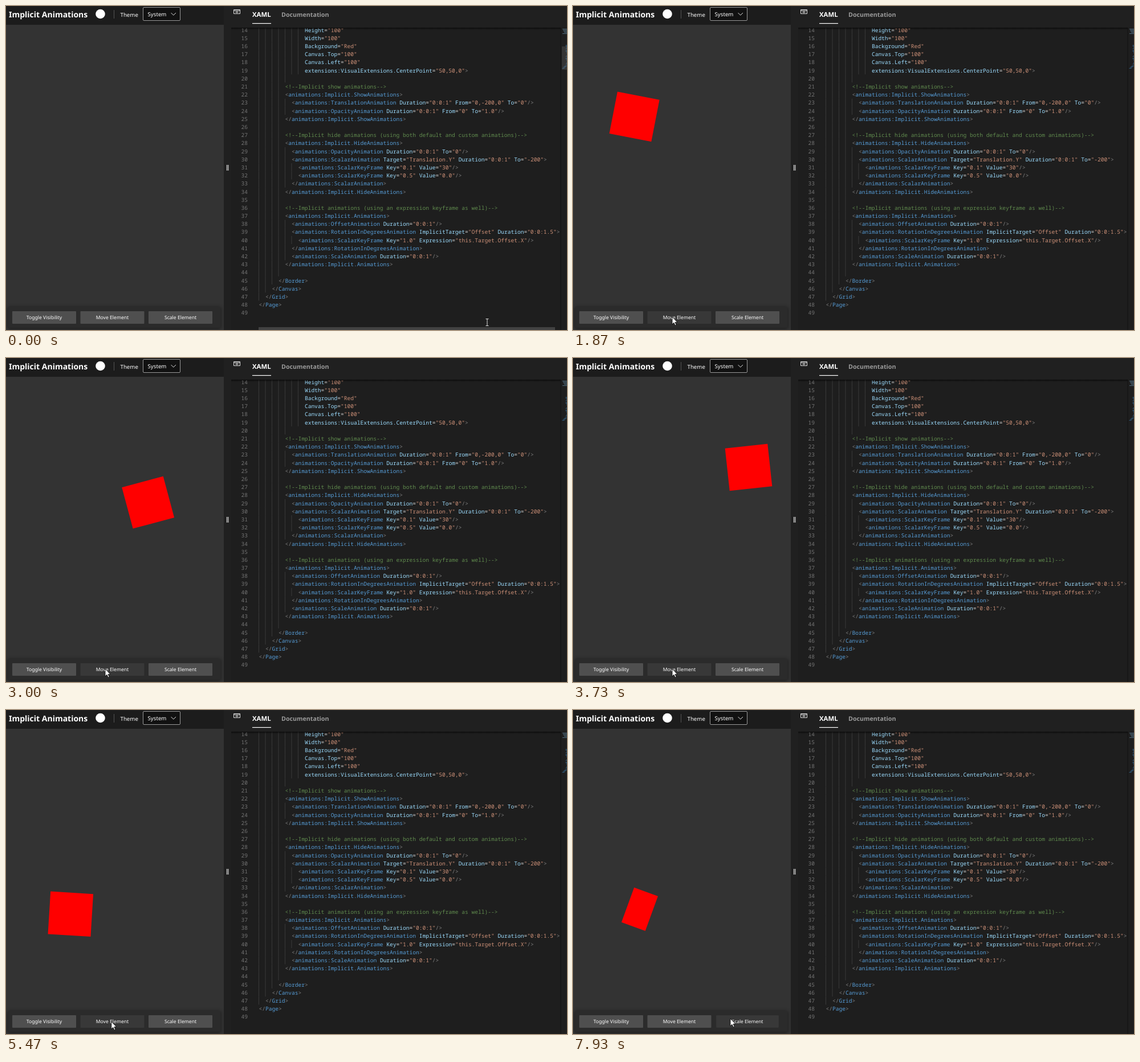
An HTML page for the animation above (8000 ms loop, 984 px wide and 569 px high).

```html
<!DOCTYPE html>
<html lang="en">
<head>
<meta charset="utf-8">
<title>Implicit Animations</title>
<style>
  html, body { margin: 0; width: 100%; height: 100%; overflow: hidden; background: #1e1e1e; }
  svg { display: block; width: 100%; height: 100%; }
  text { font-family: "Noto Sans", sans-serif; fill: #fff; text-rendering: geometricPrecision; }
  .code text { font: 500 9.573px "Noto Sans Mono", monospace; }
  .code .number { fill: #747474; font-weight: 400; text-anchor: end; }
  .comment { fill: #608b4e; }
  .delimiter { fill: #808080; }
  .tag { fill: #569cd6; }
  .attribute { fill: #9cdcfe; }
  .equals { fill: #d4d4d4; }
  .string { fill: #ce9178; }
  .button text { font-size: 8.6px; text-anchor: middle; }
</style>
</head>
<body>
<svg viewBox="0 0 984 569">
  <defs>
    <clipPath id="canvasClip"><rect y="33" width="382" height="536"/></clipPath>
    <filter id="blur" x="-10%" y="-50%" width="120%" height="200%"><feGaussianBlur stdDeviation="3"/></filter>
    <linearGradient id="fade" x2="0" y2="1">
      <stop stop-color="#000" stop-opacity=".6"/><stop offset="1" stop-color="#000" stop-opacity="0"/>
    </linearGradient>
  </defs>

  <!-- Preview pane -->
  <rect width="382" height="569" fill="#333"/>
  <g clip-path="url(#canvasClip)">
    <rect id="square" x="-37.5" y="-37.5" width="75" height="75" fill="#f00"/>
  </g>
  <rect width="382" height="33" fill="#1c1c1c"/>
  <text x="5" y="20" font-size="14" font-weight="700">Implicit Animations</text>
  <circle cx="165.5" cy="14" r="8.3" fill="#fff"/>
  <path d="M189.5 7V22" stroke="#555"/>
  <text x="200.5" y="18.7" font-size="9.7">Theme</text>
  <rect x="240.5" y="2.5" width="65" height="23" rx="1.5" fill="#111" stroke="#9a9a9a"/>
  <text x="248.5" y="18" font-size="9.7">System</text>
  <path d="M289.5 12L293.7 16.2L298 12" fill="none" stroke="#ddd"/>
  <rect x="3" y="529" width="374" height="38" fill="#000" opacity=".4" filter="url(#blur)"/>
  <rect x="4" y="529" width="372" height="36" rx="2" fill="#2b2b2b"/>
  <g id="buttons"></g>

  <!-- Editor pane -->
  <rect x="382" width="602" height="569" fill="#202020"/>
  <rect x="395" y="38" width="589" height="531" fill="#1e1e1e"/>
  <path d="M387.5 279V289M389.8 279V289" stroke="#ddd" stroke-width="1.2"/>
  <g id="code" class="code"></g>
  <rect x="382" width="602" height="38" fill="#202020"/>
  <rect x="395" y="38" width="578" height="4" fill="url(#fade)"/>
  <path d="M973 38V569" stroke="#111"/>
  <g id="minimap"></g>
  <g id="scrollbars">
    <rect x="975" y="71" width="9" height="41" fill="#797979" opacity=".25"/>
    <rect x="443" y="564" width="520" height="5" fill="#424242"/>
  </g>
  <path d="M399.5 6.5H410.5V13.5H399.5ZM399.5 8H410.5M402 10.7H408M405 9V12.5" fill="none" stroke="#ddd"/>
  <text x="432" y="19" font-size="11.4" font-weight="600">XAML</text>
  <rect x="432" y="30" width="33" height="1.2" fill="#fff"/>
  <text x="483" y="19" font-size="10.7" font-weight="600" style="fill:#9a9a9a">Documentation</text>

  <path id="arrow" d="M0 0V13L3 10.2L5.2 15L7.2 14L5 9.4H9Z" fill="#fff" stroke="#000" stroke-width=".8"/>
  <path id="beam" d="M-2.5 -6H2.5M0 -6V6M-2.5 6H2.5" fill="none" stroke="#ddd"/>
</svg>

<script>
const source = `
              Height="100"
              Width="100"
              Background="Red"
              Canvas.Top="100"
              Canvas.Left="100"
              extensions:VisualExtensions.CenterPoint="50,50,0">

        <!--Implicit show animations-->
        <animations:Implicit.ShowAnimations>
          <animations:TranslationAnimation Duration="0:0:1" From="0,-200,0" To="0"/>
          <animations:OpacityAnimation Duration="0:0:1" From="0" To="1.0"/>
        </animations:Implicit.ShowAnimations>

        <!--Implicit hide animations (using both default and custom animations)-->
        <animations:Implicit.HideAnimations>
          <animations:OpacityAnimation Duration="0:0:1" To="0"/>
          <animations:ScalarAnimation Target="Translation.Y" Duration="0:0:1" To="-200">
            <animations:ScalarKeyFrame Key="0.1" Value="30"/>
            <animations:ScalarKeyFrame Key="0.5" Value="0.0"/>
          </animations:ScalarAnimation>
        </animations:Implicit.HideAnimations>

        <!--Implicit animations (using an expression keyframe as well)-->
        <animations:Implicit.Animations>
          <animations:OffsetAnimation Duration="0:0:1"/>
          <animations:RotationInDegreesAnimation ImplicitTarget="Offset" Duration="0:0:1.5">
            <animations:ScalarKeyFrame Key="1.0" Expression="this.Target.Offset.X"/>
          </animations:RotationInDegreesAnimation>
          <animations:ScaleAnimation Duration="0:0:1"/>
        </animations:Implicit.Animations>

      </Border>
    </Canvas>
  </Grid>
</Page>
`.split("\n").slice(1);

const byId = id => document.getElementById(id);

function add(parent, name, attributes, content = "") {
  const node = document.createElementNS("http://www.w3.org/2000/svg", name);
  for (const key in attributes) node.setAttribute(key, attributes[key]);
  node.textContent = content;
  return parent.appendChild(node);
}

function tokenClass(token, previous) {
  if (token.startsWith("<!--")) return "comment";
  if (token[0] === '"') return "string";
  if (token === "=") return "equals";
  if (/[<>]/.test(token)) return "delimiter";
  return previous[0] === "<" ? "tag" : "attribute";
}

// Blank lines take the next line's indent, one level deeper when closing a block.
function indentOf(i) {
  if (source[i]) return source[i].search(/\S/);
  if (i === source.length - 1) return 0;
  const above = indentOf(i - 1), below = indentOf(i + 1);
  return above > below ? below + 2 : below;
}

function buildCode() {
  const left = 443.5, charWidth = 5.744, lineHeight = 14.19;
  source.forEach((line, i) => {
    const y = 45.7 + i * lineHeight;
    const indent = indentOf(i);
    for (let column = 0; column < indent; column += 2) {
      add(byId("code"), "rect", { x: left + column * charWidth - .5, y: y - 10.7, width: 1, height: lineHeight, fill: "#3a3a3a" });
    }
    add(byId("code"), "text", { x: 424, y, class: "number" }, i + 14);
    const text = add(byId("code"), "text", { x: left + indent * charWidth, y });
    let previous = "";
    for (const token of line.trim().match(/<!--.*|"[^"]*"|<\/?|\/?>|=|[\w:.]+| /g) || []) {
      add(text, "tspan", { class: tokenClass(token, previous) }, token);
      previous = token;
    }
    if (line && indent < 11) {
      const x = 975.5 + indent * .75;
      add(byId("minimap"), "rect", { x, y: 58 + i * 1.5, width: Math.min(984 - x, 4), height: 1, fill: "#2f5878" });
    }
  });
  for (let i = 0; i < 5; i++) {
    add(byId("minimap"), "rect", { x: 976 + (i % 4), y: 40 + i * 2, width: 8 - (i % 4), height: 1, fill: "#4f6b7c" });
  }
}

const buttons = [["Toggle Visibility", 11], ["Move Element", 130.5], ["Scale Element", 250]].map(([label, x]) => {
  const group = add(byId("buttons"), "g", { class: "button" });
  const face = add(group, "rect", { x: -56, y: -11, width: 112, height: 22, rx: 1 });
  add(group, "text", { y: 3.2 }, label);
  return { x, group, face };
});

const mix = (a, b, p) => a + (b - a) * p;
const clamp = x => Math.min(1, Math.max(0, x));

// cubic-bezier(.41, .52, 0, .94)
function ease(x) {
  x = clamp(x);
  const curve = (s, a, b) => 3 * (1 - s) ** 2 * s * a + 3 * (1 - s) * s * s * b + s ** 3;
  let low = 0, high = 1;
  for (let i = 0; i < 24; i++) {
    const middle = (low + high) / 2;
    if (curve(middle, .41, 0) < x) low = middle; else high = middle;
  }
  return curve(low, .52, .94);
}

const shownAt = 590;
const moves = [
  { at: 1750, x: 99.5, y: 411.5 },
  { at: 2700, x: 308, y: 192 },
  { at: 3805, x: 38, y: 531 },
  { at: 4815, x: 117, y: 349.8 },
];
const scalings = [
  { at: 5996, x: .677, y: 1.883 },
  { at: 6760, x: .866, y: .592 },
];
const releaseTimes = [...moves, ...scalings, { at: 7985 }].map(step => step.at);
const pointerPath = [
  { from: 0, to: 390, x: 72, y: 539, dip: 0 },
  { from: 1240, to: 1530, x: 174, y: 546, dip: 4 },
  { from: 5400, to: 5730, x: 276, y: 542, dip: 5 },
];

// Calls step(target, elapsed) for each started step, cut short where the next one takes over.
function play(steps, t, step) {
  steps.forEach((target, i) => {
    const end = Math.min(t, steps[i + 1]?.at ?? t);
    if (end > target.at) step(target, end - target.at);
  });
}

function drawSquare(t) {
  let x = 109.5, y = 145.5, angle = 0, scaleX = 1, scaleY = 1;
  play(moves, t, (target, elapsed) => {
    const p = ease(elapsed / 1000);
    x = mix(x, target.x, p);
    y = mix(y, target.y, p);
    // The angle in degrees chases the current horizontal offset.
    angle = mix(angle, (x - 34.5) / .75, ease(elapsed / 1500));
  });
  play(scalings, t, (target, elapsed) => {
    const p = ease(elapsed / 1000);
    scaleX = mix(scaleX, target.x, p);
    scaleY = mix(scaleY, target.y, p);
  });
  const shown = ease((t - shownAt) / 1000);
  byId("square").setAttribute("opacity", shown);
  byId("square").setAttribute("transform",
    `translate(${x} ${y - 150 * (1 - shown)}) rotate(${angle}) scale(${scaleX} ${scaleY})`);
}

function pointerAt(t) {
  let x = 844, y = 555.5;
  for (const leg of pointerPath) {
    const linear = clamp((t - leg.from) / (leg.to - leg.from));
    const p = linear * linear * (3 - 2 * linear);
    x = mix(x, leg.x, p);
    y = mix(y, leg.y, p) + leg.dip * Math.sin(Math.PI * p);
  }
  return { x, y };
}

function drawPointer({ x, y }) {
  const overEditor = x > 395;
  byId("scrollbars").style.display = byId("beam").style.display = overEditor ? "" : "none";
  byId("arrow").style.display = overEditor ? "none" : "";
  for (const id of ["arrow", "beam"]) byId(id).setAttribute("transform", `translate(${x} ${y})`);
}

// A press lights the button up, then tilts it back until the release.
function drawButtons(t, pointer) {
  const untilRelease = Math.min(...releaseTimes.filter(at => at > t).map(at => at - t));
  for (const { x, group, face } of buttons) {
    const hover = pointer.x >= x && pointer.x <= x + 112;
    const lit = hover && untilRelease > 75 && untilRelease < 140;
    const tilted = hover && untilRelease < 65;
    face.setAttribute("fill", lit ? "#777" : hover ? "#383838" : "#4f4f4f");
    group.setAttribute("transform", `translate(${x + 56} 547) scale(${tilted ? .98 : 1})`);
  }
}

function frame() {
  const step = 1000 / 15;
  const t = Math.floor((performance.now() % 8000 + 4) / step) * step % 8000;
  const pointer = pointerAt(t);
  drawSquare(t);
  drawPointer(pointer);
  drawButtons(t, pointer);
  requestAnimationFrame(frame);
}

buildCode();
frame();
</script>
</body>
</html>
```
